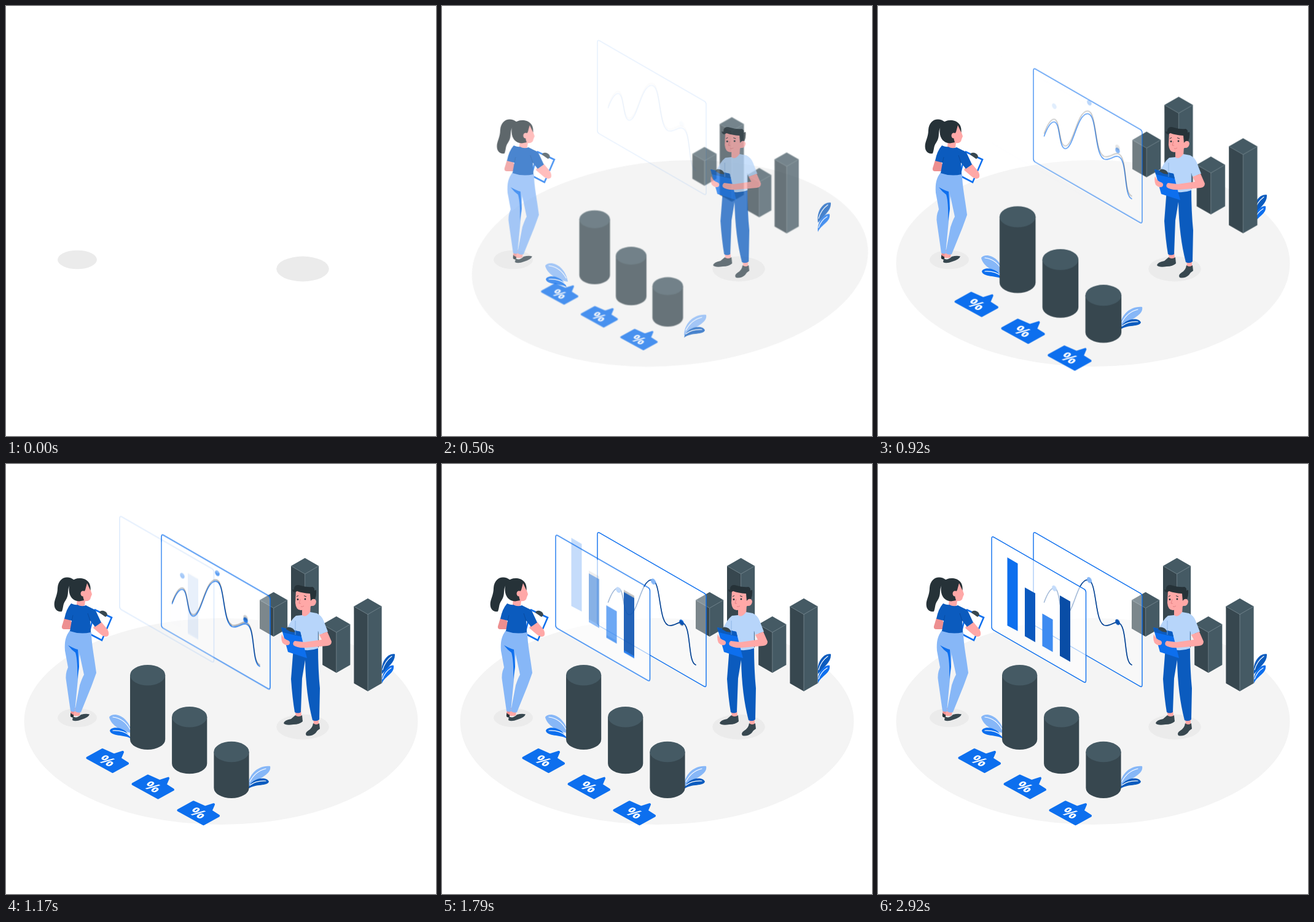
These frames come from a looping animation (700x700 px, 2960 ms). An HTML page:

```html
<!DOCTYPE html>
<html lang="en">
<head>
<meta charset="utf-8">
<title>Isometric statistics</title>
<style>
  :root { --blue: #0d6fee; --deep: #0b5bbe; --light: #87b7f7; --ink: #263238; --slate: #37474f; --steel: #455a64; --skin: #ffa8a7; }
  html, body { margin: 0; width: 100%; height: 100%; overflow: hidden; background: #fff; }
  svg { display: block; width: 700px; height: 700px; }

  .anim, #screens > * { animation: 1s cubic-bezier(.36, -.01, .5, 1.38) both; }
  #floor { animation-name: sweep; transform-box: fill-box; transform-origin: center; }
  #plants { animation-name: rise; }
  #stats { animation-name: grow; transform-origin: 370.5px 371px; }
  #man { animation-name: fromLeft; }
  #woman { animation-name: fromRight; }
  #screens, #screens > * { animation-name: drop; animation-duration: 1.5s; }

  @keyframes sweep {
    from { opacity: 0; transform: translate3d(-50%, 0, 0) skewX(20deg); }
    60% { opacity: 1; transform: skewX(-10deg); }
    80% { opacity: 1; transform: skewX(2deg); }
    to { opacity: 1; transform: translate3d(0, 0, 0); }
  }
  @keyframes rise { from { opacity: 0; transform: translateY(42px); } }
  @keyframes drop { from { opacity: 0; transform: translateY(-42px); } }
  @keyframes grow { from { opacity: 0; transform: scale(.5); } }
  @keyframes fromLeft { from { opacity: 0; transform: translateX(-42px); } }
  @keyframes fromRight { from { opacity: 0; transform: translateX(42px); } }

  .blue { fill: var(--blue); }
  .deep { fill: var(--deep); }
  .light { fill: var(--light); }
  .ink { fill: var(--ink); }
  .slate { fill: var(--slate); }
  .steel { fill: var(--steel); }
  .skin { fill: var(--skin); }
  .shade { fill: #ed8f90; }
  .line { fill: none; stroke: var(--blue); stroke-width: 1.4; }
  .vein { fill: none; stroke: #fff; stroke-width: 1.2; stroke-linecap: round; }
  .edge { fill: none; stroke: #82939b; stroke-width: .7; }
  .tag { fill: var(--blue); stroke: var(--blue); stroke-width: 4; stroke-linejoin: round; }
  text { font: 700 27px "Open Sans", "Noto Sans", sans-serif; fill: #fff; text-anchor: middle; }
</style>
</head>
<body>
<svg viewBox="0 0 700 700">
  <defs>
    <path id="panelA" d="M253 114.500q0-4.500 4-2.200L427 210.300q3 1.800 3 5V359.500q0 4.500-4 2.200L256 263.500q-3-1.800-3-5Z"/>
    <path id="panelB" d="M185 121.500q0-4.500 4-2.200L335.500 203.700q3 1.800 3 5V352.500q0 4.500-4 2.200L188 270.300q-3-1.800-3-5Z"/>
    <path id="curve" fill="none" stroke-width="1.600" stroke-linecap="round" d="M270.500 225C276 210 281 201.500 287 202C297 203 294 245.500 305 245.500C318 245.500 324 189 341 188.500C358 188 351 263 371 263C379 263 384 257 390 258C407 260 399 322 413 327"/>
    <ellipse id="dot" rx="3.300" ry="5" transform="rotate(-28)"/>
    <path id="bar1" d="M210.500 152l17 10V272l-17-9Z"/>
    <path id="bar2" d="M239 201l17 9.500V290l-17-9.800Z"/>
    <path id="bar3" d="M267.500 243.500l17 9.800V306l-17-9.800Z"/>
    <path id="bar4" d="M296 214l17 9.800V322l-17-9.800Z"/>
  </defs>

  <ellipse id="floor" class="anim" cx="350" cy="419" rx="320.500" ry="168" fill="#f4f4f4"/>
  <g fill="#ebebeb">
    <ellipse cx="116" cy="413" rx="32" ry="15.300"/>
    <ellipse cx="483" cy="428" rx="42.800" ry="20.400"/>
  </g>

  <g id="plants" class="anim">
    <path class="light" d="M205 438C182 434 170 422 168 412C174 403 199 408 205 438Z"/>
    <path class="blue" d="M203 447C193 440 171 444 169 434C173 425 197 429 203 447Z"/>
    <path class="vein" d="M174 412Q192 414 202 432M174 434Q191 433 201 442"/>
    <path class="light" d="M394 526C394 506 410 490 430 492C433 505 412 511 394 526Z"/>
    <path class="deep" d="M394 529C398 511 424 507 428 517C426 525 406 520 394 529Z"/>
    <path class="vein" d="M397 517Q406 500 423 496M397 523Q407 515 423 516"/>
    <path class="deep" d="M612 342C609 322 622 307 633 309.500C634 322 622 330 612 342Z"/>
    <path class="blue" d="M612 357C610 341 622 326 631 328C633 341 618 344 612 357Z"/>
    <path class="vein" d="M613 335Q617 321 628 313M613 350Q617 338 627 332"/>
  </g>

  <g id="stats" class="anim"></g>

  <g id="screens" class="anim">
    <use href="#panelA" fill="#fff" fill-opacity=".35"/>
    <use href="#panelA" class="line"/>
    <use href="#curve" stroke="#0d6fee"/>
    <use href="#curve" stroke="#000" stroke-opacity=".4"/>
    <g class="blue"><use href="#dot" x="390" y="257.500"/></g>
    <g fill-opacity=".25"><use href="#dot" x="390" y="257.500"/></g>
    <g class="blue"><use href="#dot" x="344" y="189"/></g>
    <g fill="#fff" fill-opacity=".5"><use href="#dot" x="344" y="189"/></g>
    <g class="blue"><use href="#dot" x="287" y="202.500"/></g>
    <g fill="#fff" fill-opacity=".3"><use href="#dot" x="287" y="202.500"/></g>
    <use href="#panelB" fill="#fff" fill-opacity=".65"/>
    <use href="#panelB" class="line"/>
    <use href="#bar4" class="blue"/>
    <use href="#bar4" fill-opacity=".3"/>
    <use href="#bar3" class="blue"/>
    <use href="#bar3" fill="#fff" fill-opacity=".2"/>
    <use href="#bar2" class="blue"/>
    <use href="#bar2" fill-opacity=".2"/>
    <use href="#bar1" class="blue"/>
  </g>

  <g id="woman" class="anim">
    <path class="ink" d="M111 189C100 180 85 185 84 202C84 216 76 223 79.500 234C82 240 88 241 91 240C94 232 92 229 97 222C104 212 98 204 105 196Z"/>
    <path class="shade" d="M95 251L91 264Q90 269 95 269H106L109 262L105 254Z"/>
    <path class="skin" d="M116 216L115 229Q121 236 128 230L129 223Q137 224 138 217L140 212L137 203L135 193L124 196Z"/>
    <path class="ink" d="M120 186C108 186 102 194 102.500 205C103 216 109 223 119 223.500L127 222Q123 212 129 205L132 194L137.500 206C139 193 131 186 120 186Z"/>
    <ellipse class="skin" cx="125.500" cy="211" rx="4" ry="4.500"/>
    <path d="M145 237.500L172 250L156 287L135 276Z" fill="#fff" stroke="#0d6fee" stroke-width="2.600"/>
    <path class="slate" d="M152 242Q153 238 159 239Q165 241 165 246L162 249Z"/>
    <path class="skin" d="M144 263L155 257L165 269Q169 276 166 280Q161 283 155 278L142 267Z"/>
    <path class="shade" d="M106 396L105 408L111 410L113 397ZM112 397L109 408L120 409L121 398Z"/>
    <path class="skin" d="M112 398L109 410L119 410L121 400Z"/>
    <path class="ink" d="M105.500 405Q104 411 106 412L110 413V408Q107 408 105.500 405Z"/>
    <path class="slate" d="M109 411Q115 415 122 408Q130 406 136 407.500Q134 413 123 416Q113 420 108 417Z"/>
    <path class="light" d="M104 271C97 280 95 289 96 304L101 331Q96 342 98 353L105 402Q108 404 112 403L119 330L120 300Z"/>
    <path class="blue" d="M101 295Q112 301 117 302L119 330L116 350Q117 320 113 307Q106 302 101 295Z"/>
    <path class="light" d="M104 271L139 274C139 293 144 315 147 340Q142 354 139 362L122 404Q116 406 112 402L120 360Q124 348 127 343L118 301Q101 297 98 284Z"/>
    <path class="deep" d="M106 227Q113 230 116 229Q123 233 130 230L140 235Q146 237 148 243L155 258L145 265L137 255Q138 268 138 274Q121 278 104 272L107 255L95 252Q98 236 106 227Z"/>
    <path d="M137 255L133 243M107 255L109 246" fill="none" stroke="#08489a" stroke-width=".8"/>
  </g>

  <g id="man" class="anim">
    <path class="skin" d="M470 400L472 411Q476 415 481 409L480 400ZM500 412L501 425Q506 428 509 423L509 412Z"/>
    <path class="slate" d="M471 409Q476 413 482 409L483 419Q478 424 468 424Q455 426 452 422Q453 417 464 415ZM500 422Q505 426 510 422L511 431Q507 433 504 438Q497 444 489 442Q486 438 492 434Q499 430 500 422Z"/>
    <path class="deep" d="M468 298L464 350Q466 380 470 404Q475 407 480 404Q481 375 482 349L487 319Q488 375 499 417Q505 420 510 416L511 365Q508 335 508 298Z"/>
    <path class="skin" d="M482 233L482 247Q488 252 495 245L496 229Z"/>
    <path d="M482 246Q488 251 495 241L506 243Q514 247 517 255L524 273L510 278L508 272V300Q490 307 471 299V278L457 270Q463 254 472 247Z" fill="#b7d5fa"/>
    <path class="skin" d="M472 206L471 226Q472 238 480 238Q490 237 497 231Q504 232 505 224Q504 218 498 220L498 206Z"/>
    <path class="ink" d="M470 209Q466 208 466 204Q470 206 469 202Q471 195 480 198Q490 201 499 200Q503 202 502 206L505 205Q506 213 503 220Q499 218 496 223L495 211Q482 210 474 207Z"/>
    <g class="ink">
      <circle cx="475" cy="220.500" r="1.400"/><circle cx="487" cy="220" r="1.400"/>
      <path d="M473 216l3-2M485 214.500l4 1.500" stroke="#263238"/>
    </g>
    <path d="M479 220l-2 7h3M480 232q3 1 5-1" fill="none" stroke="#e27d80" stroke-width=".9"/>
    <path class="blue" d="M448 266L479 273L490 316L459 306Z"/>
    <path class="deep" d="M448 266L479 273L481 281L450 274Z"/>
    <path class="slate" d="M456 269Q457 264 463 266Q470 268 470 274L463 273Z"/>
    <path class="skin" d="M449 277Q447 284 450 291Q456 297 461 294Q464 289 459 287Q452 285 449 277Z"/>
    <path class="skin" d="M510 278L523 273L530 289Q530 295 523 296L489 299Q474 300 468 295Q466 291 470 288L486 290L514 286Z"/>
    <path d="M471 278V255M508 286V272" fill="none" stroke="#85aee0" stroke-width=".8"/>
  </g>
</svg>
<script>
  const stats = document.getElementById('stats');

  // left, apex height, lowest point
  const block = (x, top, low) => {
    const w = 22.6, h = 13, m = x + w, r = m + w, y = top + h;
    return `<path class="steel" d="M${x} ${y}L${m} ${top}L${r} ${y}V${low - h}L${m} ${low}Z"/>
      <path class="slate" d="M${x} ${y}L${m} ${y + h}V${low}L${x} ${low - h}Z"/>
      <path class="edge" d="M${x} ${y}L${m} ${y + h}L${r} ${y}M${m} ${y + h}V${low}"/>`;
  };
  const cylinder = (x, top, low) => {
    const rx = 28.6, ry = 16.7;
    return `<path class="slate" d="M${x} ${top + ry}V${low - ry}a${rx} ${ry} 0 0 0 ${2 * rx} 0V${top + ry}Z"/>
      <ellipse class="steel" cx="${x + rx}" cy="${top + ry}" rx="${rx}" ry="${ry}"/>`;
  };
  const tag = i => `<g transform="translate(${74 * i} ${42.6 * i})">
      <path class="tag" d="M132.500 478.500L157 465L176 473.500L190 469L185.500 479.500L198 487.500L173.500 501Z"/>
      <text transform="matrix(.9 .4 -.65 .55 165 483)" y="9.600">%</text></g>`;

  stats.innerHTML =
    block(413, 208.5, 281) + block(464, 153, 311) + block(515.2, 248, 340) + block(566.4, 218.8, 370) +
    cylinder(202, 327, 465) + cylinder(270.1, 395, 504.3) + cylinder(338.4, 451.8, 544) +
    [0, 1, 2].map(tag).join('');

  [...document.getElementById('screens').children].forEach((el, i) => {
    el.style.animationDelay = i * 78 + 'ms';
  });

  // The CSS animations share one looping clock at 24 steps a second.
  const LOOP = 2960, STEP = 1000 / 24;
  const anims = document.getAnimations();
  anims.forEach(a => a.pause());

  function tick() {
    const t = performance.now() % LOOP;
    const time = Math.min(70, Math.floor((t + 5) / STEP)) * STEP;
    anims.forEach(a => { a.currentTime = time; });
    requestAnimationFrame(tick);
  }
  tick();
</script>
</body>
</html>
```
